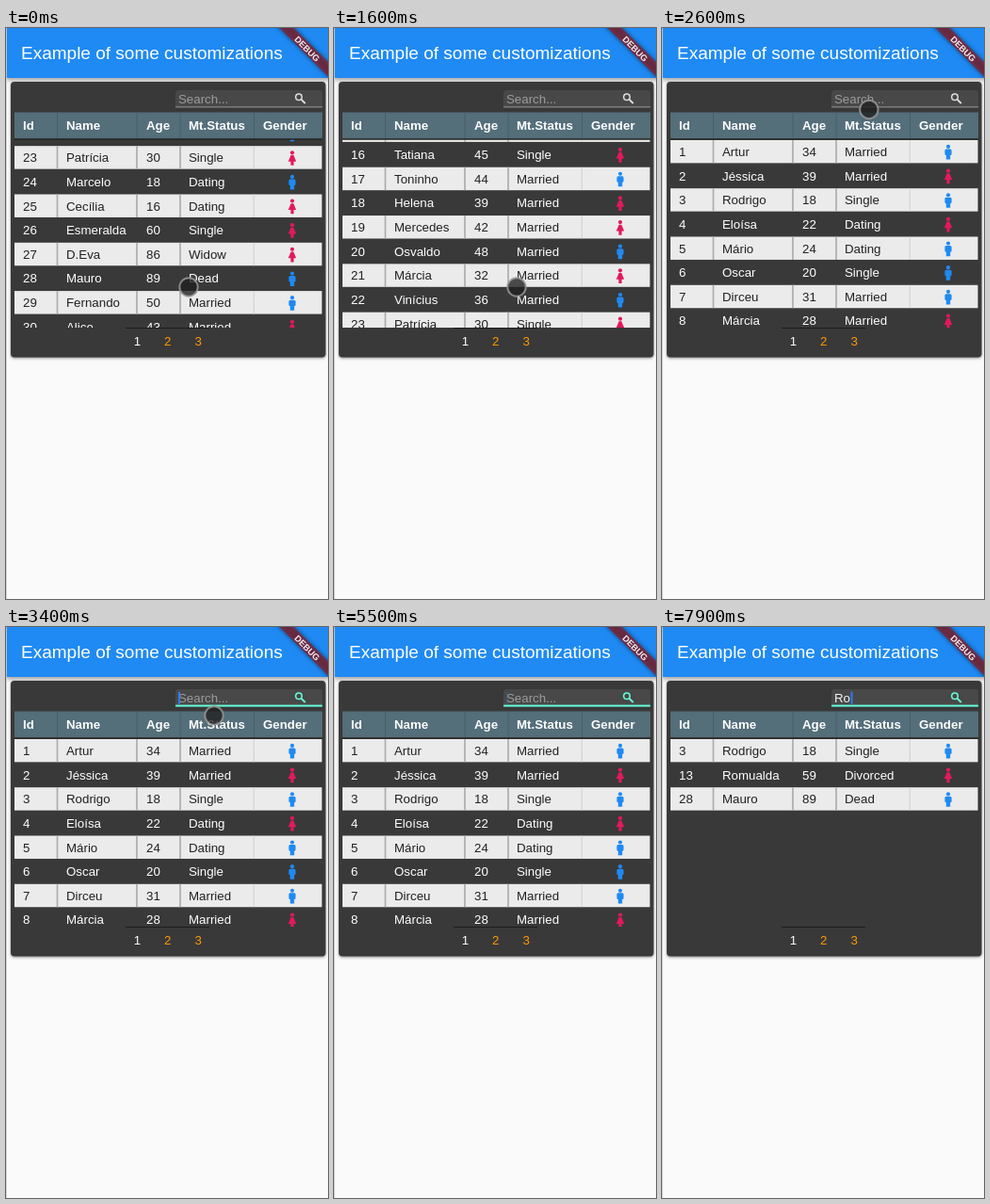
Write an HTML page with a canvas that moves like this. It is 342x606 px and loops after 8 s.

```html
<!DOCTYPE html>
<html lang="en">
<head>
<meta charset="utf-8">
<title>Data table</title>
<style>
  html, body { margin: 0; width: 100%; height: 100%; overflow: hidden; background: #fafafa; }
  canvas { display: block; width: 342px; height: 606px; }
</style>
</head>
<body>
<canvas id="stage" width="342" height="606"></canvas>
<script>
const ctx = document.getElementById('stage').getContext('2d');
const LOOP = 8000, STEP = 100;
const ROW = 25.65, LIST_TOP = 118.3, LIST_BOTTOM = 318;
const FONT = '"Liberation Sans", Arial, sans-serif';
const BLUE = '#1f8af3', PINK = '#e3185f', TEAL = '#64ffda', ORANGE = '#ff9800';
const COLUMNS = [['Id', 18], ['Name', 64], ['Age', 149], ['Mt.Status', 194], ['Gender', 273]];
const DIVIDERS = [54.5, 139, 185, 263.5];
const STATUS = { M: 'Married', S: 'Single', D: 'Dating', W: 'Widow', X: 'Dead', V: 'Divorced' };

// name, age, status, gender
const PEOPLE = `Artur 34 M m;Jéssica 39 M f;Rodrigo 18 S m;Eloísa 22 D f;Mário 24 D m;Oscar 20 S m
Dirceu 31 M m;Márcia 28 M f;Cláudio 41 M m;Beatriz 27 S f;Otávio 52 M m;Camila 19 D f
Romualda 59 V f;Simone 33 M f;Felipe 38 S m;Tatiana 45 S f;Toninho 44 M m;Helena 39 M f
Mercedes 42 M f;Osvaldo 48 M m;Márcia 32 M f;Vinícius 36 M m;Patrícia 30 S f;Marcelo 18 D m
Cecília 16 D f;Esmeralda 60 S f;D.Eva 86 W f;Mauro 89 X m;Fernando 50 M m;Alice 43 M f`
  .split(/[;\n]/).map((line, i) => {
    const [name, age, status, gender] = line.trim().split(' ');
    return { id: i + 1, name, age, status: STATUS[status], gender };
  });

const MAX_SCROLL = PEOPLE.length * ROW - 200;
const POINTER = [[1900, 194, 275], [2700, 221, 78], [3200, 221, 78], [3400, 221, 94],
                 [3600, 221, 150], [3800, 222, 412]];

const clamp = x => Math.max(0, Math.min(1, x));
const smooth = x => x * x * (3 - 2 * x);

function scrollAt(t) {
  if (t < 1330) return MAX_SCROLL - 11.5 * (1 - clamp(t / 300)) ** 2;
  return MAX_SCROLL * (1 - clamp((t - 1330) / 470) ** 2);
}

function pointerAt(t) {
  if (t >= 4000) return null;
  if (t <= POINTER[0][0]) return POINTER[0].slice(1);
  const i = POINTER.findIndex(key => key[0] >= t);
  if (i < 0) return POINTER[POINTER.length - 1].slice(1);
  const [t0, x0, y0] = POINTER[i - 1], [t1, x1, y1] = POINTER[i];
  const k = smooth((t - t0) / (t1 - t0));
  return [x0 + (x1 - x0) * k, y0 + (y1 - y0) * k];
}

const queryAt = t => t < 7100 ? '' : t < 7500 ? 'R' : 'Ro';

function caretAlpha(t) {
  if (t < 2900) return 0;
  if (t < 4080 || t >= 7100) return 1;
  const phase = (t - 480) % 1000;
  return phase < 600 ? clamp(phase / 100) : clamp((700 - phase) / 100);
}

function rect(x, y, w, h, color) {
  ctx.fillStyle = color;
  ctx.fillRect(x, y, w, h);
}

function roundRect(x, y, w, h, r, color) {
  ctx.fillStyle = color;
  ctx.beginPath();
  ctx.roundRect(x, y, w, h, r);
  ctx.fill();
}

function circle(x, y, r) {
  ctx.beginPath();
  ctx.arc(x, y, r, 0, Math.PI * 2);
}

function text(str, x, y, color, size = 13.3, weight = 'normal') {
  ctx.font = `${weight} ${size}px ${FONT}`;
  ctx.fillStyle = color;
  ctx.fillText(str, x, y);
}

function withShadow(color, blur, dy, draw) {
  ctx.save();
  ctx.shadowColor = color;
  ctx.shadowBlur = blur;
  ctx.shadowOffsetY = dy;
  draw();
  ctx.restore();
}

function person(x, y, gender) {
  ctx.fillStyle = gender === 'm' ? BLUE : PINK;
  circle(x, y - 5.6, 2.1);
  ctx.fill();
  ctx.beginPath();
  if (gender === 'm') {
    ctx.roundRect(x - 3.6, y - 3.1, 7.2, 6.6, 1.5);
    ctx.rect(x - 2.2, y + 2, 4.4, 6);
  } else {
    ctx.moveTo(x - 1.4, y - 3);
    ctx.lineTo(x + 1.4, y - 3);
    ctx.lineTo(x + 4.2, y + 3.8);
    ctx.lineTo(x - 4.2, y + 3.8);
    ctx.closePath();
    ctx.rect(x - 1.6, y + 3, 3.2, 5);
  }
  ctx.fill();
}

function drawRow(p, index, top) {
  const light = index % 2 === 0, mid = top + ROW / 2;
  if (light) {
    rect(9, top + 0.6, 326.5, ROW - 1.2, '#ebebeb');
    DIVIDERS.forEach((x, i) => rect(x - 0.8, top + 0.6, i < 3 ? 1.6 : 1, ROW - 1.2, i < 3 ? '#aaaaaa' : '#cfcfcf'));
  }
  [p.id, p.name, p.age, p.status].forEach((value, i) =>
    text(value, COLUMNS[i][1], mid + 4.8, light ? '#212121' : '#ffffff'));
  person(304, mid + 0.4, p.gender);
}

function drawList(t) {
  const query = queryAt(t).toLowerCase(), scroll = scrollAt(t);
  ctx.save();
  ctx.beginPath();
  ctx.rect(5, LIST_TOP, 334, LIST_BOTTOM - LIST_TOP);
  ctx.clip();
  PEOPLE.filter(p => p.name.toLowerCase().includes(query)).forEach((p, i) => {
    const top = LIST_TOP + i * ROW - scroll;
    if (top > LIST_TOP - ROW && top < LIST_BOTTOM) drawRow(p, i, top);
  });
  ctx.restore();
}

function drawHeader() {
  rect(9, 89.5, 327, 28, '#546e7a');
  DIVIDERS.forEach(x => rect(x - 0.5, 89.5, 1, 28, '#466069'));
  rect(9, 117.3, 327, 1.4, '#242424');
  COLUMNS.forEach(([label, x]) => text(label, x, 108, '#ffffff', 13.3, 'bold'));
}

function drawSearch(t) {
  const focused = t >= 2900, query = queryAt(t);
  roundRect(180, 66, 156, 18, [3, 3, 0, 0], '#484848');
  rect(180, focused ? 82.6 : 83.4, 156, focused ? 2 : 1, focused ? TEAL : '#9b9b9b');
  text(query || 'Search...', 183, 80, query ? '#f2f2f2' : '#9c9c9c');
  const caretX = 183 + (query ? ctx.measureText(query).width + 0.5 : 0);
  ctx.globalAlpha = caretAlpha(t);
  roundRect(caretX, 68.5, 2, 13.5, 1, '#2f7df0');
  ctx.globalAlpha = 1;

  ctx.strokeStyle = focused ? TEAL : '#dddddd';
  ctx.lineWidth = 1.5;
  circle(311, 73.2, 3.3);
  ctx.stroke();
  ctx.lineWidth = 1.9;
  ctx.beginPath();
  ctx.moveTo(313.6, 75.8);
  ctx.lineTo(317.8, 80);
  ctx.stroke();
}

function drawFooter() {
  rect(127, 318, 89, 1, '#1c1c1c');
  ['1', '2', '3'].forEach((n, i) => text(n, 135.8 + i * 32.3, 337, i ? ORANGE : '#ffffff'));
}

function drawAppBar() {
  withShadow('rgba(0,0,0,.4)', 5, 2, () => rect(0, 0, 342, 53, BLUE));
  text('Example of some customizations', 16, 33.3, '#ffffff', 19);
}

function drawRibbon() {
  ctx.save();
  ctx.translate(342, 0);
  ctx.rotate(Math.PI / 4);
  withShadow('rgba(0,0,0,.8)', 5, 0, () => rect(-50, 25.5, 100, 11, 'rgba(150,26,34,.66)'));
  ctx.textAlign = 'center';
  text('DEBUG', 0, 34.5, '#f4eef0', 9.3, 'bold');
  ctx.restore();
}

function drawPointer(t) {
  const at = pointerAt(t);
  if (!at) return;
  circle(at[0], at[1], 9.7);
  ctx.fillStyle = 'rgba(32,32,32,.8)';
  ctx.fill();
  ctx.lineWidth = 2;
  ctx.strokeStyle = 'rgba(150,150,150,.85)';
  ctx.stroke();
}

function draw(t) {
  rect(0, 0, 342, 606, '#fafafa');
  drawAppBar();
  withShadow('rgba(0,0,0,.45)', 3, 1, () => roundRect(5, 57, 334.5, 292.5, 4, '#393939'));
  drawList(t);
  drawHeader();
  drawSearch(t);
  drawFooter();
  rect(0, 0, 1, 606, 'rgba(205,205,205,.8)');
  drawRibbon();
  drawPointer(t);
}

const start = performance.now();
function tick() {
  const t = (performance.now() - start) % LOOP;
  draw(Math.floor(t / STEP) * STEP);
  requestAnimationFrame(tick);
}
tick();
</script>
</body>
</html>
```
